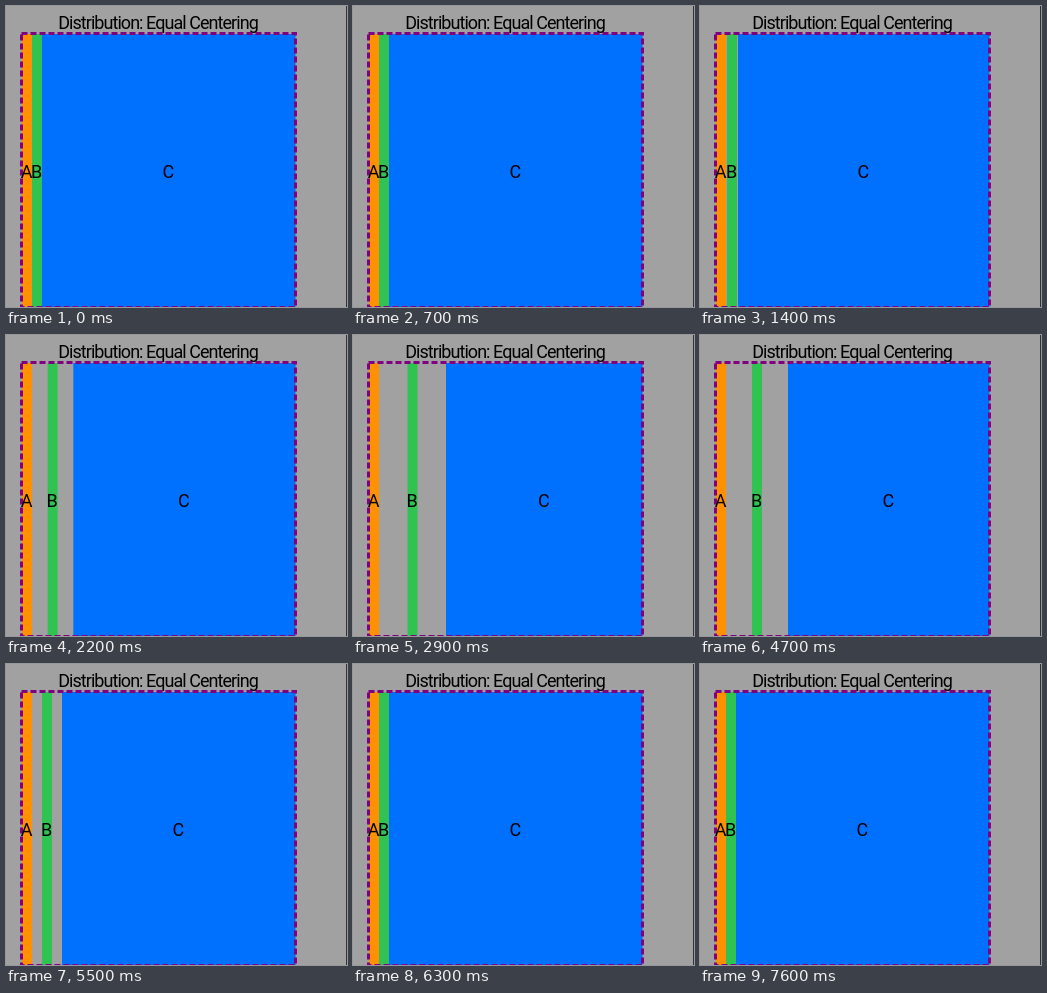
These frames come from a looping animation (341x301 px, 7.7 s). An HTML page:

```html
<!DOCTYPE html>
<html lang="en">
<head>
<meta charset="utf-8">
<title>Distribution</title>
<style>
  html, body { margin: 0; width: 100%; height: 100%; overflow: hidden; background: #a1a1a1; }
  svg { display: block; }
  text { font: 18px Roboto, Inter, sans-serif; text-anchor: middle; fill: #000; }
  .title { letter-spacing: -.95px; }
</style>
</head>
<body>
<svg width="341" height="301" viewBox="0 0 341 301">
  <rect width="341" height="301" fill="#a1a1a1"/>
  <rect x="340" width="1" height="301" fill="#333"/>
  <g id="bars"></g>
  <rect x="15.5" y="27.5" width="274" height="274" fill="none"
        stroke="#800080" stroke-width="3" stroke-dasharray="6 3"/>
  <text class="title" x="152" y="23">Distribution: Equal Centering</text>
  <g id="labels"></g>
</svg>
<script>
const LOOP = 7700, STEP = 100;
const LEFT = 16, RIGHT = 289.5, TOP = 28, NARROW = 10;

// [time in ms, gap between neighbouring bars in px]
const gapKeys = [[0, 0], [1300, 0], [1400, 1], [2900, 28.5], [3700, 45.5], [4700, 26], [6000, 0], [LOOP, 0]];

function make(tag, parent, attrs) {
  const node = document.createElementNS('http://www.w3.org/2000/svg', tag);
  for (const key in attrs) node.setAttribute(key, attrs[key]);
  return document.getElementById(parent).appendChild(node);
}

const bars = [['A', '#ff9000'], ['B', '#30c352'], ['C', '#0070ff']].map(([name, fill]) => {
  const label = make('text', 'labels', { y: 171.5 });
  label.textContent = name;
  return { rect: make('rect', 'bars', { y: TOP, height: 301 - TOP, fill }), label };
});

function gapAt(time) {
  const next = gapKeys.findIndex(([t]) => t > time);
  const [t0, g0] = gapKeys[next - 1], [t1, g1] = gapKeys[next];
  return g0 + (g1 - g0) * (time - t0) / (t1 - t0);
}

function place({ rect, label }, x, width) {
  rect.setAttribute('x', x);
  rect.setAttribute('width', width);
  label.setAttribute('x', x + width / 2 - .5);
}

function draw(time) {
  const gap = gapAt(Math.floor(time % LOOP / STEP) * STEP);
  const secondX = LEFT + NARROW + gap;
  const thirdX = secondX + NARROW + gap;
  place(bars[0], LEFT, NARROW);
  place(bars[1], secondX, NARROW);
  place(bars[2], thirdX, RIGHT - thirdX);
}

const start = performance.now();
function tick() {
  draw(performance.now() - start);
  requestAnimationFrame(tick);
}
tick();
</script>
</body>
</html>
```
